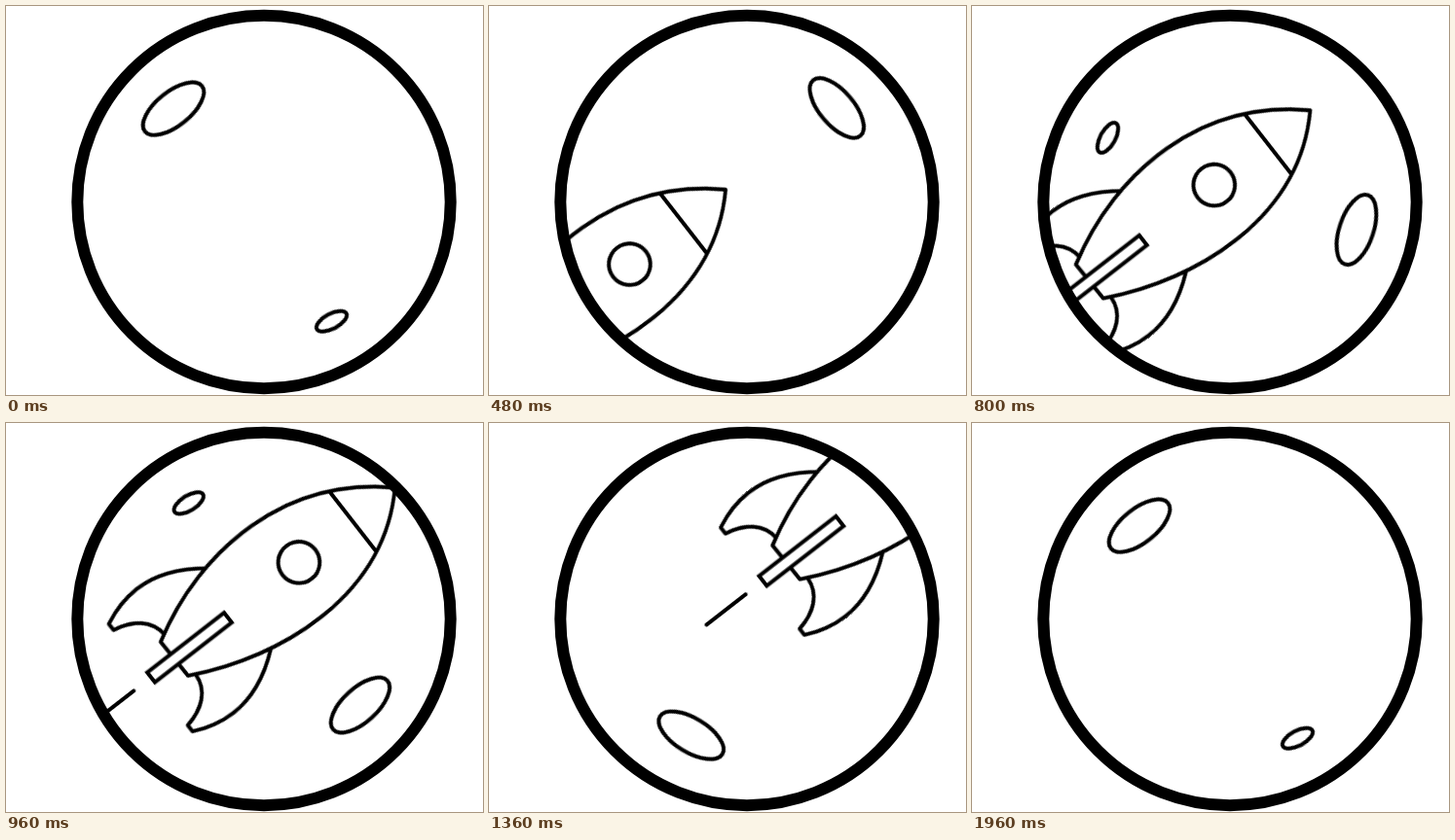
An HTML page without scripts for the animation above (2 s loop, 490 by 400 pixels).

```html
<!DOCTYPE html>
<html lang="en">
<head>
<meta charset="utf-8">
<title>Rocket</title>
<style>
  html, body { margin: 0; width: 100%; height: 100%; overflow: hidden; background: #fff; }
  svg { display: block; width: 490px; height: 400px; }
  .ink { fill: #fff; stroke: #000; stroke-width: 4; stroke-linejoin: round; stroke-linecap: round; }
  .sharp { stroke-linejoin: miter; }
  .ring { fill: none; stroke: #000; stroke-width: 12; }

  /* 25 pictures per second; the last pose equals the first */
  .moons {
    transform-origin: 265px 200.9px;
    animation: orbit 2s -2ms infinite steps(50, jump-none);
  }
  .rocket { animation: fly 2s -2ms infinite steps(25, jump-none); }

  @keyframes orbit {
    from { transform: rotate(0deg); }
    to { transform: rotate(360deg); }
  }
  /* the course bends slightly halfway */
  @keyframes fly {
    0% { transform: translate(-313px, 244.5px); }
    49.99% { transform: translate(0, 0); }
    50% { transform: translate(13.2px, -9.9px); }
    100% { transform: translate(331px, -248px); }
  }
</style>
</head>
<body>
<svg viewBox="0 0 490 400">
  <defs>
    <clipPath id="porthole"><circle cx="265" cy="201.5" r="190"/></clipPath>
    <path id="fin" d="M84 -52.5C45 -84 6 -88 -31.5 -70V-62C-10 -58 6 -46 7 -26L40 -20Z"/>
  </defs>

  <g clip-path="url(#porthole)">
    <g class="ink moons">
      <ellipse rx="37.5" ry="17.5" transform="translate(172 105.6) rotate(-38.6)"/>
      <ellipse rx="17.2" ry="7.7" transform="translate(334.5 324.2) rotate(-28)"/>
    </g>
    <g class="ink rocket">
      <g transform="translate(173.5 242.5) rotate(-37.9)">
        <path d="M-104.5 0H-53.5"/>
        <use href="#fin"/>
        <use href="#fin" transform="scale(1 -1)"/>
        <path d="M-.8 -22.7C90 -74 205 -77 286.5 0C212 80 90 68 0 22Z"/>
        <path d="M231 -37.5V38.5"/>
        <circle cx="161.5" r="21.3"/>
        <rect class="sharp" x="-31" y="-6.4" width="100" height="12.8"/>
      </g>
    </g>
  </g>
  <circle class="ring" cx="265" cy="201.5" r="191.7"/>
</svg>
</body>
</html>
```
